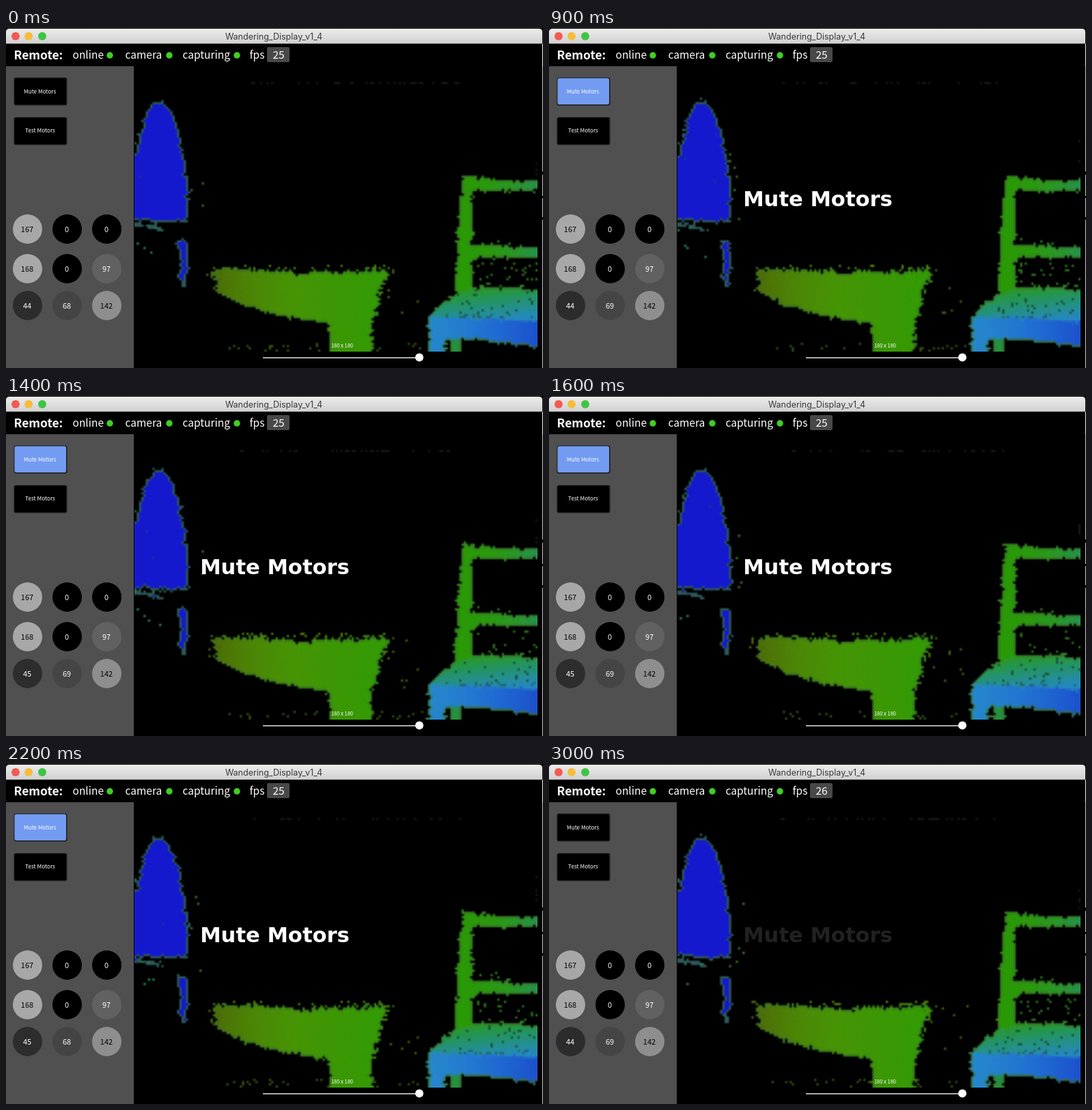
An HTML page with a canvas for the animation above (3.1 s loop, 786 by 498 pixels).

```html
<!DOCTYPE html>
<html lang="en">
<head>
<meta charset="utf-8">
<title>Depth monitor</title>
<style>
  html, body { margin: 0; width: 100%; height: 100%; overflow: hidden; background: #000; }
  canvas, svg { position: absolute; left: 0; top: 0; display: block; }
  svg text { font-family: "Noto Sans CJK JP", "Noto Sans CJK SC", "Noto Sans", sans-serif; fill: #fff; }
  .title { font: 12.5px Inter, sans-serif; fill: #3a3a3a; }
  .head { font-size: 15.5px; }
  .remote { font-size: 17.4px; font-weight: 700; }
  .small { font-size: 8.2px; }
  .cell { font-size: 11px; }
  #banner { font: 700 30.6px "DejaVu Sans", sans-serif; }
  .mid { text-anchor: middle; }
</style>
</head>
<body>
<canvas id="stage" width="786" height="498"></canvas>
<svg id="ui" width="786" height="498" viewBox="0 0 786 498">
  <defs>
    <linearGradient id="bar" x2="0" y2="1">
      <stop stop-color="#ececec"/><stop offset="1" stop-color="#d0d0d0"/>
    </linearGradient>
  </defs>
  <path d="M0 23V6Q0 1 5 1H780Q785 1 785 6V23Z" fill="url(#bar)"/>
  <path d="M0 22.5H785" stroke="#b4b4b4"/>
  <path d="M785.5 23V56" stroke="#f4f4f4"/>
  <path d="M785.5 56V210M785.5 215V246M785.5 249V277M785.5 281V498" stroke="#c8c8c8"/>
  <circle cx="14" cy="12" r="6" fill="#f25a52"/>
  <circle cx="33" cy="12" r="6" fill="#f6bd3a"/>
  <circle cx="53" cy="12" r="6" fill="#3ec544"/>
  <text class="title mid" x="392" y="17">Wandering_Display_v1_4</text>

  <text class="remote" x="11.500" y="46">Remote:</text>
  <text class="head" x="97.500" y="44.500">online</text>
  <text class="head" x="174.500" y="44.500">camera</text>
  <text class="head" x="258.500" y="44.500">capturing</text>
  <text class="head" x="356.500" y="44.500">fps</text>
  <g fill="#40cf20">
    <circle cx="152" cy="40" r="4.700"/>
    <circle cx="239" cy="40" r="4.700"/>
    <circle cx="338" cy="40" r="4.700"/>
  </g>
  <rect x="382" y="28" width="33" height="22" rx="2" fill="#484848"/>
  <text id="fps" class="head mid" x="399" y="45">25</text>

  <path d="M0 56H187V498H0Z" fill="#505050"/>
  <rect x="11.500" y="72.500" width="78" height="41" rx="3" fill="#1c1c1c"/>
  <rect id="mute" x="12.500" y="73.500" width="75.500" height="38.500" rx="2.500"/>
  <rect x="11.500" y="130.500" width="78" height="41" rx="3" fill="#1c1c1c"/>
  <rect x="12.500" y="131.500" width="75.500" height="38.500" rx="2.500"/>
  <text class="small mid" x="49.700" y="96">Mute Motors</text>
  <text class="small mid" x="50" y="153">Test Motors</text>
  <g id="cells"></g>

  <text id="banner" class="mid" x="393.500" y="261">Mute Motors</text>
  <text class="mid" x="492" y="468" font-size="7.500">180 x 180</text>
  <path d="M376 483H605" stroke="#e4e4e4" stroke-width="1.600"/>
  <circle cx="605" cy="482.500" r="6" fill="#fff"/>
</svg>
<script>
const LOOP = 3100, STEP = 100;
const VIEW = { x: 188, y: 79, w: 590, h: 395 };
const COLS = 180, ROWS = 121;
const $ = id => document.getElementById(id);
const ctx = $('stage').getContext('2d');

function hash(a, b, c) {
  const s = Math.sin(a * 12.9898 + b * 78.233 + c * 37.719) * 43758.5453;
  return s - Math.floor(s);
}

function makeGrid() {
  const canvas = document.createElement('canvas');
  canvas.width = COLS;
  canvas.height = ROWS;
  return canvas.getContext('2d', { willReadFrequently: true });
}

// Smooth depth picture, drawn once in stage coordinates on the coarse grid
function paintScene() {
  const g = makeGrid();
  g.scale(COLS / VIEW.w, ROWS / VIEW.h);
  g.translate(-VIEW.x, -VIEW.y);
  const ramp = (x0, y0, x1, y1, ...colors) => {
    const r = g.createLinearGradient(x0, y0, x1, y1);
    colors.forEach((c, i) => r.addColorStop(i / (colors.length - 1), c));
    return r;
  };
  const fill = (path, style) => {
    g.fillStyle = style;
    g.fill(new Path2D(path));
  };
  const blue = '#1519ce';
  fill('M186 282V203L191 178L195 157L201 137L209 118L216 107L222 104L230 107L243 125L250 146L256 164L261 187L265 215L266 238V285L232 284Z', blue);
  fill('M251 311H266V350L263 379H256Z', blue);
  g.strokeStyle = blue;
  g.lineWidth = 5;
  g.stroke(new Path2D('M188 288L212 290L229 297'));

  fill('M302 354L345 352L430 359L510 356L557 353V366L548 385L544 408L534 440L537 480H473L471 433L400 422L350 407L325 396L307 386Z',
    ramp(303, 0, 545, 0, '#4e6c08', '#4c8706', '#469505', '#3c9704', '#339b04'));

  fill('M667 217L683 218L715 222L790 221V241L684 240L681 318H700L790 320V339L690 338L683 346V384L656 394L659 330L663 270Z',
    ramp(665, 0, 778, 0, '#299906', '#2a990c', '#299824', '#249250'));
  fill('M655 389L690 379H740L790 384V433L618 424L640 402Z',
    ramp(690, 380, 696, 432, '#2b9820', '#249558', '#24908a', '#2488c0'));
  fill('M617 420L640 424L700 425L790 432V469L735 462L690 458L642 456V480H619Z',
    ramp(620, 0, 778, 0, '#2688cb', '#247bd0', '#1f68d2', '#1d51cc'));
  fill('M651 456L667 455L665 480H651Z', '#259040');
  return g.getImageData(0, 0, COLS, ROWS).data;
}

const scene = paintScene();
const grid = makeGrid();
const picture = grid.createImageData(COLS, ROWS);
const mask = new Uint16Array(COLS * ROWS);
const clamp = (v, max) => Math.max(0, Math.min(max, Math.round(v)));

// x, y, width, height, density, colour, share of places that flicker
const speckles = [
  [340, 79, 325, 3, .25, '#151515', 1],
  [775, 165, 3, 50, .2, '#161616', 1],
  [188, 288, 42, 12, .05, '#2a7a50', 1],
  [188, 314, 42, 26, .035, '#258457', .6],
  [264, 180, 26, 132, .01, '#3b7224', 1],
  [293, 350, 22, 45, .05, '#4c680c', .7],
  [318, 464, 155, 10, .1, '#344f12', .6],
  [335, 350, 222, 5, .12, '#4c7d08', .8],
  [537, 464, 75, 10, .1, '#314d12', .6],
  [548, 348, 16, 50, .08, '#43780a', .7],
  [560, 350, 55, 80, .01, '#3d6111', .8],
  [684, 345, 92, 33, .07, '#2c711d', .7],
  [692, 307, 30, 10, .05, '#327720', .8],
  [655, 387, 122, 34, .055, '#17533b', .6],
  [642, 423, 134, 4, .2, '#22666c', .5],
  [193, 140, 66, 130, .003, '#1a388e', .8]
];

function drawDepth(step) {
  for (let y = 0; y < ROWS; y++) {
    for (let x = 0; x < COLS; x++) {
      // Only part of the edge cells change between readings
      const seed = hash(x, y, 3) < .5 ? 0 : step + 1;
      const rough = x > 30 && x < 115 && (y < 92 || x > 100) ? 2 : 1.2;
      const sx = clamp(x + (hash(x, y, seed) - .5) * rough, COLS - 1);
      const sy = clamp(y + (hash(y, x, seed + 50) - .5) * rough, ROWS - 1);
      const from = sy * COLS + sx;
      mask[y * COLS + x] = scene[from * 4 + 3] > 127 ? from + 1 : 0;
    }
  }
  const rim = [64, 132, 42];
  for (let i = 0; i < mask.length; i++) {
    const x = i % COLS;
    const inner = (x === 0 || mask[i - 1]) && (x === COLS - 1 || mask[i + 1]) &&
      (i < COLS || mask[i - COLS]) && (i >= mask.length - COLS || mask[i + COLS]);
    const from = (mask[i] - 1) * 4;
    for (let c = 0; c < 3; c++) {
      picture.data[i * 4 + c] = !mask[i] ? 0 :
        inner ? scene[from + c] : scene[from + c] * .3 + rim[c] * .6;
    }
    picture.data[i * 4 + 3] = 255;
  }
  grid.putImageData(picture, 0, 0);

  const size = VIEW.w / COLS;
  speckles.forEach(([left, top, w, h, density, color, flicker], n) => {
    grid.fillStyle = color;
    const x0 = Math.floor((left - VIEW.x) / size), y0 = Math.floor((top - VIEW.y) / size);
    for (let x = x0; x < Math.min(COLS, x0 + w / size); x++) {
      for (let y = y0; y < Math.min(ROWS, y0 + h / size); y++) {
        const seed = hash(x, y, n) < flicker ? step + 1 : 0;
        if (hash(x + 7, y + 3, seed + n * 40) < density) grid.fillRect(x, y, 1, 1);
      }
    }
  });
  ctx.fillStyle = '#000';
  ctx.fillRect(0, 0, 786, 498);
  ctx.drawImage(grid.canvas, VIEW.x, VIEW.y, VIEW.w, VIEW.h);
}

function svg(tag, attrs) {
  const el = document.createElementNS('http://www.w3.org/2000/svg', tag);
  for (const key in attrs) el.setAttribute(key, attrs[key]);
  return $('cells').appendChild(el);
}

const cells = Array.from({ length: 9 }, (_, i) => {
  const x = 31.5 + (i % 3) * 58, y = [294.5, 352.5, 406.5][Math.floor(i / 3)];
  const disc = svg('circle', { cx: x, cy: y, r: 21.5 });
  const label = svg('text', { x: x - .5, y: y + 4.5, class: 'cell mid' });
  return value => {
    disc.style.fill = `rgb(${value},${value},${value})`;
    label.style.fill = value > 127 ? '#000' : '#fff';
    label.textContent = value;
  };
});

const within = (t, from, to) => t >= from && t < to;

function draw(step) {
  const t = step * STEP;
  drawDepth(step);
  const low = within(t, 200, 700) || within(t, 1200, 2600) ? 45 : 44;
  const middle = within(t, 700, 2000) || t >= 2700 ? 69 : 68;
  [167, 0, 0, 168, 0, 97, low, middle, 142].forEach((value, i) => cells[i](value));
  $('fps').textContent = t >= 2800 ? 26 : 25;
  $('mute').style.fill = within(t, 100, 2600) ? '#739bf1' : '#000';
  $('banner').style.opacity = Math.max(0, Math.min(1, t / 300, (3060 - t) / 460));
}

let shown = -1;
function tick() {
  const step = Math.floor(performance.now() % LOOP / STEP);
  if (step !== shown) draw(shown = step);
  requestAnimationFrame(tick);
}
tick();
</script>
</body>
</html>
```
